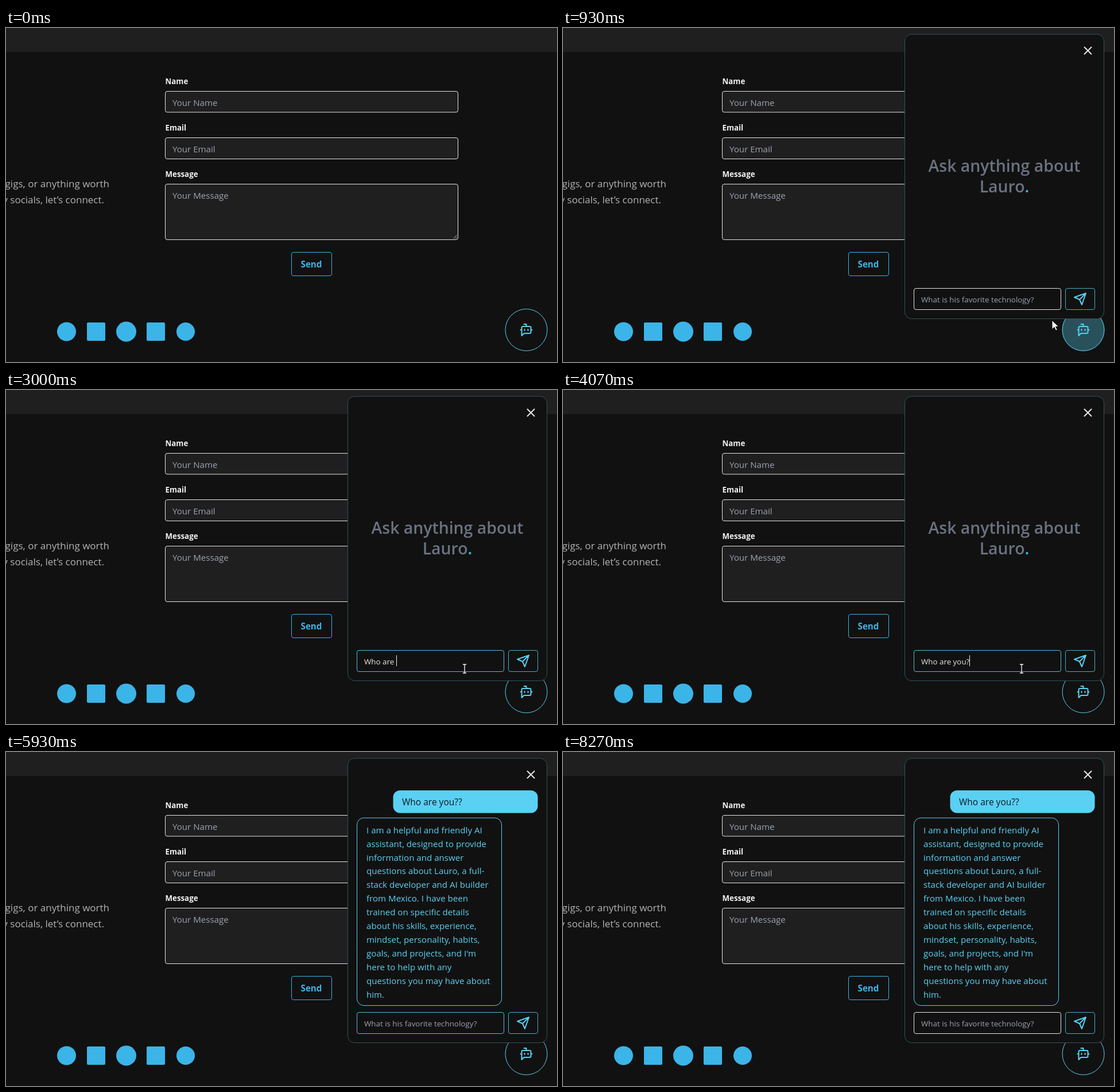
Write an HTML page that moves like this. It is 960x583 px and loops after 8340 ms.

```html
<!DOCTYPE html>
<html lang="en">
<head>
<meta charset="utf-8">
<title>Chat assistant</title>
<style>
html, body { margin: 0; width: 100%; height: 100%; overflow: hidden; background: #111; }
svg { display: block; width: 100vw; height: 100vh; font-family: "Open Sans", "Noto Sans", sans-serif; }
text { white-space: pre; }
.label { font-size: 13.3px; font-weight: 700; fill: #f1f1f1; }
.body { font-size: 15.1px; }
.small { font-size: 13.35px; }
.lead { font-size: 17px; fill: #b4b4b4; text-anchor: end; }
.title { font-size: 28.4px; font-weight: 600; fill: #6b7280; text-anchor: middle; }
.bold { font-size: 15.2px; font-weight: 700; text-anchor: middle; }
.hint { fill: #9ca3af; }
.field { fill: #1f1f1f; stroke: #e5e5e5; }
.line { fill: none; stroke-width: 2; stroke-linecap: round; stroke-linejoin: round; }
.cyan { stroke: #5ad1f2; }
.pointer { fill: #fff; stroke: #000; stroke-linejoin: round; }
</style>
</head>
<body>
<svg viewBox="0 0 960 583">
  <rect width="960" height="583" fill="#111"/>
  <rect width="960" height="42" fill="#1f1f1f"/>

  <text class="lead" x="180" y="278">gigs, or anything worth</text>
  <text class="lead" x="171" y="305.5">my socials, let’s connect.</text>

  <g id="form"></g>
  <path d="M779.5 367.5l6-6M783 367.5l2.5-2.5" stroke="#bbb" fill="none"/>
  <rect x="497.5" y="391.5" width="70" height="41" rx="3.5" fill="none" stroke="#3bb4e8"/>
  <text class="bold" x="532" y="418" fill="#3bb4e8">Send</text>

  <g fill="#3bb4e8">
    <circle cx="105.5" cy="530" r="16.5"/>
    <rect x="141" y="514" width="32" height="32" rx="2"/>
    <circle cx="209.5" cy="530" r="17.5"/>
    <rect x="245" y="514" width="32" height="32" rx="2"/>
    <circle cx="313" cy="530" r="16"/>
  </g>

  <circle cx="906.5" cy="527" r="36.5" fill="#111" class="cyan"/>
  <circle id="hover" cx="906.5" cy="527" r="37" fill="#5ad1f2"/>
  <path id="bot" class="line" transform="translate(894.5 515)"
    d="M12 6V2H8M8 18l-4 4V8a2 2 0 0 1 2-2h12a2 2 0 0 1 2 2v8a2 2 0 0 1-2 2ZM2 12h2M9 11v2M15 11v2M20 12h2"/>

  <g id="panel">
    <rect x="595.5" y="11" width="347" height="496.5" rx="12" fill="#111" stroke="#2c5560"/>
    <path class="line" d="M908.5 33.5l12 12M920.5 33.5l-12 12" stroke="#e8e8e8"/>
    <g id="intro">
      <text class="title" x="769" y="251">Ask anything about</text>
      <text class="title" x="769" y="287">Lauro<tspan fill="#3bb4e8">.</tspan></text>
    </g>
    <g id="question">
      <rect x="674.5" y="67" width="252" height="39.5" rx="12" fill="#5ad1f2"/>
      <text x="690" y="93" font-size="15.5" fill="#111827">Who are you??</text>
    </g>
    <g id="reply">
      <rect x="611.5" y="115" width="252" height="327.5" rx="12" fill="none" class="cyan"/>
    </g>
    <rect id="input" x="611.5" y="454.5" height="37" rx="3.5" fill="#111"/>
    <text id="hint" class="small hint" x="624" y="478.5">What is his favorite technology?</text>
    <text id="typed" class="small" x="624" y="478.5" fill="#e8e8e8"></text>
    <rect id="caret" y="463" width="1" height="19" fill="#f0f0f0"/>
    <g id="send">
      <rect x="875.5" y="454.5" width="51" height="37" rx="3.5" fill="none" stroke="#46adc9"/>
      <path class="line cyan" transform="translate(889 461)" d="M22 2l-7 20-4-9-9-4ZM22 2 11 13"/>
    </g>
    <g id="asking">
      <rect x="873.5" y="454.5" width="53" height="37" rx="3.5" fill="none" stroke="#2f7387"/>
      <text class="bold" x="900" y="479.5" fill="#35819a">Asking...</text>
    </g>
  </g>

  <g id="cursor">
    <path id="hand" class="pointer" d="M-2 2a2 2 0 0 1 4 0v6l7 2q2.5.8 2.3 3.5l-.8 5-1.5 4h-9l-5.5-8q-1.5-2.2.5-3.2 1.5-.5 3 1.5z"/>
    <path id="arrow" class="pointer" d="M0 0v16l4-4 2.7 6 2.6-1.1-2.7-5.9h5z"/>
    <path id="beam" d="M-3-7.5h6M0-7.5v15M-3 7.5h6" fill="none" stroke="#fff" stroke-width="1.3"/>
  </g>
</svg>
<script>
const LOOP = 8340;
const TICK = 1000 / 15;
const QUESTION = "Who are you??";
const KEYS = [28, 34, 35, 37, 41, 43, 44, 45, 49, 51, 53, 61, 65];
const FOCUS = 21, SENT = 71, ANSWERED = 89, BLUR = 124, BLINK = 8;
const REPLY = [
  "I am a helpful and friendly AI", "assistant, designed to provide",
  "information and answer", "questions about Lauro, a full-",
  "stack developer and AI builder", "from Mexico. I have been",
  "trained on specific details", "about his skills, experience,",
  "mindset, personality, habits,", "goals, and projects, and I'm",
  "here to help with any", "questions you may have about", "him."
];

// Pointer legs: [tick, x, y] stops, visible from first to last tick
const LEGS = [
  [[2, 905, 545], [4, 905, 534], [9, 905, 534], [19, 799, 486.5], [79, 799, 486.5], [82, 848, 470]],
  [[94, 896, 478], [97, 862, 345], [99, 790, 264], [101, 690, 290], [103, 600, 400],
   [104, 545, 458], [105, 490, 490], [106, 446, 487], [109, 321, 566]]
];

const $ = id => document.getElementById(id);
const show = (id, on) => $(id).setAttribute("display", on ? "inline" : "none");
const ramp = (n, a, b) => Math.min(1, Math.max(0, (n - a) / (b - a)));
const smooth = u => u * u * (3 - 2 * u);
const within = (p, x, y, w, h) => p.x >= x && p.x <= x + w && p.y >= y && p.y <= y + h;

function addField(name, y, h) {
  return `<text class="label" x="277.5" y="${y - 12.5}">${name}</text>
    <rect class="field" x="277.5" y="${y}" width="510" height="${h}" rx="3.5"/>
    <text class="body hint" x="290" y="${y + 25}">Your ${name}</text>`;
}
$("form").innerHTML = addField("Name", 110.5, 36.5) + addField("Email", 191.5, 37) + addField("Message", 272.5, 97);
$("reply").innerHTML += REPLY.map((s, i) =>
  `<text class="body" x="628" y="${141.7 + i * 23.92}" fill="#5ad1f2">${s}</text>`).join("");

function pointerAt(n) {
  const leg = LEGS.find(l => n >= l[0][0] && n <= l[l.length - 1][0]);
  if (!leg) return null;
  const i = Math.max(1, leg.findIndex(s => s[0] >= n));
  const [a, ax, ay] = leg[i - 1], [b, bx, by] = leg[i];
  const u = leg === LEGS[0] ? smooth(ramp(n, a, b)) : ramp(n, a, b);
  return { x: ax + (bx - ax) * u, y: ay + (by - ay) * u };
}

function pointerKind(p, n) {
  if (within(p, 611, 454, 256, 37)) return "beam";
  if (n >= ANSWERED && within(p, 628, 125, 216, 305)) return "beam";
  const overPanel = n >= 5 && within(p, 595, 11, 348, 497);
  if (!overPanel && Math.hypot(p.x - 906.5, p.y - 527) < 37) return "hand";
  return "arrow";
}

function drawPointer(n) {
  const p = pointerAt(n);
  show("cursor", p);
  if (!p) return;
  $("cursor").setAttribute("transform", `translate(${p.x} ${p.y})`);
  const kind = pointerKind(p, n);
  for (const id of ["hand", "arrow", "beam"]) show(id, id === kind);
}

function drawInput(n) {
  const waiting = n >= SENT && n < ANSWERED;
  const focused = n >= FOCUS && n < BLUR;
  const pressed = KEYS.filter(k => k <= n);
  const text = n < SENT ? QUESTION.slice(0, pressed.length) : "";
  const since = n - (pressed.length ? pressed[pressed.length - 1] : FOCUS);

  $("input").setAttribute("width", waiting ? 254 : 256);
  $("input").setAttribute("stroke", focused ? "#4fbcdb" : "#e5e5e5");
  $("typed").textContent = text;
  show("hint", !text);
  show("caret", focused && Math.floor(since / BLINK) % 2 === 0);
  $("caret").setAttribute("x", 624 + (text ? Math.round($("typed").getComputedTextLength()) : 0));
  show("send", !waiting);
  show("asking", waiting);
}

function draw(ms) {
  const n = Math.floor((ms % LOOP + 3.5) / TICK);
  const hover = ramp(n, 1, 4) * (1 - ramp(n, 12, 15));
  $("hover").setAttribute("opacity", hover);
  $("bot").setAttribute("stroke", hover > 0.5 ? "#111827" : "#5ad1f2");
  $("panel").setAttribute("opacity", ramp(n, 4, 8));
  show("intro", n < SENT);
  show("question", n >= SENT);
  show("reply", n >= ANSWERED);
  drawInput(n);
  drawPointer(n);
}

const start = performance.now();
function loop() {
  draw(performance.now() - start);
  requestAnimationFrame(loop);
}
loop();
</script>
</body>
</html>
```
